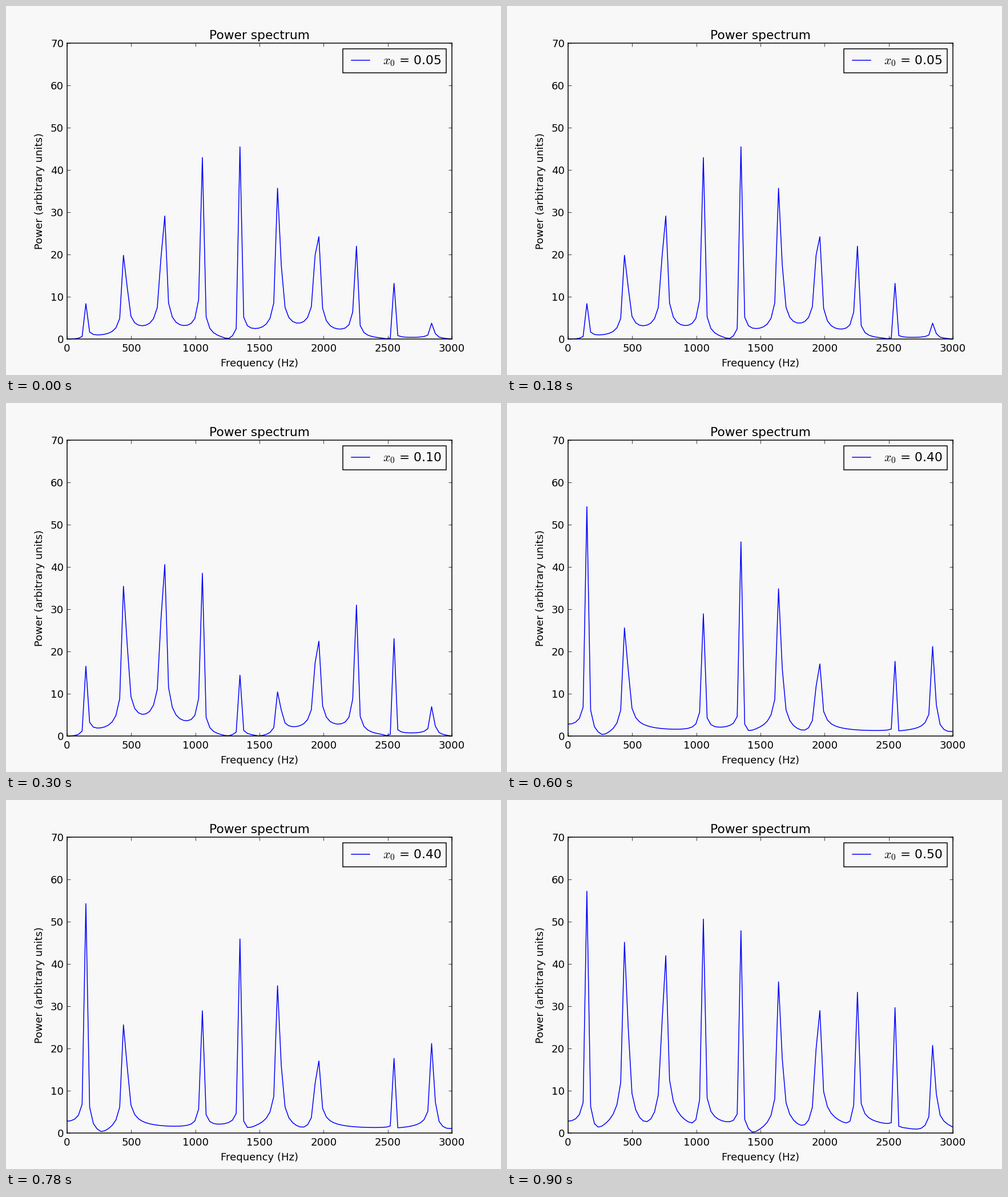
These frames come from a looping animation (867 by 646 pixels, 1200 ms). A matplotlib script:

```python
import numpy as np
import matplotlib.pyplot as plt
from matplotlib.animation import FuncAnimation
from matplotlib.lines import Line2D
from matplotlib.patches import Rectangle

W, H, DPI = 867, 646, 128
PT = 72 / DPI                      # points per pixel
BG = "#f8f8f8"
LEFT, RIGHT, TOP, BOTTOM = 107, 781, 65, 583

CELLS, STEPS = 100, 1024
RATE = 30000                       # samples per second (300 m/s over 1 cm cells)
PLUCKS = [0.05, 0.10, 0.40, 0.50]

plt.rcParams.update({
    "font.family": "DejaVu Sans",
    "font.size": 18.1 * PT,
    "mathtext.fontset": "cm",
    "axes.linewidth": 1.5 * PT,
    "path.simplify": False,
})


def spectrum(x0):
    """Spectrum at the midpoint of a string with a Gaussian pluck at x0."""
    x = np.linspace(0, 1, CELLS + 1)
    y = np.exp(-1000 * (x - x0) ** 2)
    y[[0, -1]] = 0
    old = y.copy()
    signal = np.empty(STEPS)
    for n in range(STEPS):
        signal[n] = y[CELLS // 2]
        new = np.zeros_like(y)
        new[1:-1] = y[2:] + y[:-2] - old[1:-1]
        old, y = y, new
    return np.abs(np.fft.rfft(signal))


freqs = np.fft.rfftfreq(STEPS, 1 / RATE)
spectra = [spectrum(x0) for x0 in PLUCKS]

fig = plt.figure(figsize=(W / DPI, H / DPI), dpi=DPI, facecolor=BG)
ax = fig.add_axes([LEFT / W, 1 - BOTTOM / H,
                   (RIGHT - LEFT) / W, (BOTTOM - TOP) / H], facecolor=BG)
ax.set(xlim=(0, 3000), ylim=(0, 70),
       xticks=range(0, 3001, 500), yticks=range(0, 71, 10))
ax.tick_params(direction="in", top=True, right=True,
               length=6 * PT, width=0.75 * PT)
ax.tick_params(axis="x", pad=7.7 * PT)
ax.tick_params(axis="y", pad=6 * PT)
curve, = ax.plot([], [], color="blue", lw=1.5 * PT)


def label(x, y, text, size=18.1, **kw):
    return fig.text(x / W, 1 - y / H, text, fontsize=size * PT,
                    va="baseline", **kw)


mid = (LEFT + RIGHT) / 2
label(mid, 57.5, "Power spectrum", 21.8, ha="center")
label(mid, 631, "Frequency (Hz)", ha="center")
label(64.5, (TOP + BOTTOM) / 2, "Power (arbitrary units)", ha="center",
      rotation=90, rotation_mode="anchor")

# Legend, in pixels from the bottom left corner
fig.add_artist(Rectangle((590, H - 117), 181, 42, transform=None,
                         fc=BG, ec="black", lw=1.5 * PT))
fig.add_artist(Line2D([605, 636.5], [H - 94.5] * 2, transform=None,
                      color="blue", lw=1.5 * PT))
legend = label(659.5, 102, "", 21.8)


def update(i):
    curve.set_data(freqs, spectra[i])
    legend.set_text(f"$x_0$ = {PLUCKS[i]:.2f}")
    return curve, legend


anim = FuncAnimation(fig, update, frames=len(PLUCKS), interval=300,
                     repeat=True, repeat_delay=0)
plt.show()
```
